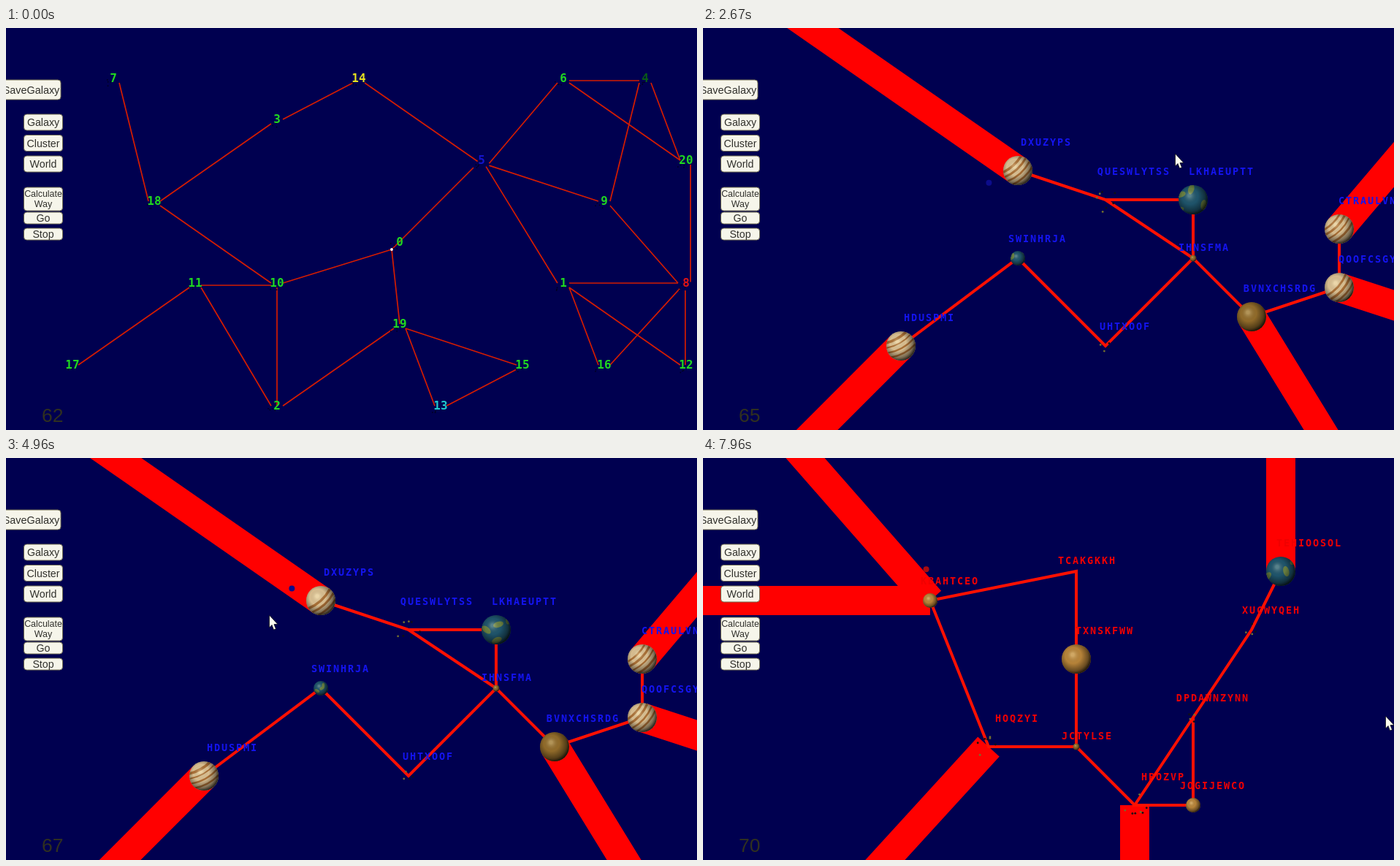
Animation, 946 px wide and 550 px high, one loop 8000 ms. Source, as an HTML page with a canvas:

```html
<!DOCTYPE html>
<html lang="en">
<head>
<meta charset="utf-8">
<title>Galaxy map</title>
<style>
html, body { margin: 0; width: 100%; height: 100%; overflow: hidden; background: #000050; }
canvas { display: block; }
</style>
</head>
<body>
<canvas id="stage" width="946" height="550"></canvas>
<script>
const ctx = document.getElementById('stage').getContext('2d');
const LOOP = 8000, ZOOM = 28, TAU = Math.PI * 2;
const SANS = '"Liberation Sans", Arial, sans-serif';
const MONO = '"DejaVu Sans Mono", monospace';

const ease = x => { x = Math.min(1, Math.max(0, x)); return x * x * (3 - 2 * x); };
const clamp = (v, mid, half) => Math.min(mid + half, Math.max(mid - half, v));
const noise = n => { const v = Math.sin(n * 127.1) * 43758.5; return v - Math.floor(v); };

// The map as a grid of numbered nodes
const nodes = {};
`. 7 . . . . . 14 . . . . 6 . 4 .
. . . . . 3 . . . . . . . . . .
. . . . . . . . . . 5 . . . . 20
. . 18 . . . . . . . . . . 9 . .
. . . . . . . . 0 . . . . . . .
. . . 11 . 10 . . . . . . 1 . . 8
. . . . . . . . 19 . . . . . . .
17 . . . . . . . . . . 15 . 16 . 12
. . . . . 2 . . . 13 . . . . . .`.split('\n').forEach((text, row) => text.split(' ').forEach((id, col) => {
  if (id !== '.') nodes[id] = { x: 91 + col * 56, y: 68 + row * 56 };
}));
const tint = { 14: '#e4e020', 4: '#0a5a18', 5: '#1414cc', 8: '#e01414', 13: '#20c8cc' };
const roads = '7-18 18-3 3-14 18-10 11-10 10-0 11-17 11-2 10-2 2-19 19-0 19-13 19-15 13-15 6-4 6-20 4-9 4-20 1-16 1-12';

const origin = id => [nodes[id].x - 11, nodes[id].y + 11];

// Where a road coming from (x, y) meets a node; node 0 is a single point
function port(id, x, y) {
  const n = nodes[id];
  return id === '0' ? origin(id) : [clamp(x, n.x, 8), clamp(y, n.y + 4, 3)];
}

// Bodies: name, kind, column, row, size. Links and exits refer to them by index.
const clusters = [
  makeCluster('5', '#1414f0', 8, 0, '0 1 2 4 1,8 3 9 4 7 6 5', '0-14 8-0 5-6 6-9 7-1',
    `DXUZYPS band 10 1 20
    QUESWLYTSS rock 13 2 20
    LKHAEUPTT earth 16 2 20
    SWINHRJA earth 10 4 10
    IHNSFMA dark 16 4 0
    CTRAULVN band 21 3 20
    QOOFCSGY band 21 5 20
    BVNXCHSRDG dark 18 6 20
    HDUSPMI band 6 7 20
    UHTXOOF rock 13 7 10`),
  makeCluster('8', '#f00000', 3, 9, '0 1 2 4 3 2,3 5 7 8 9 6 5', '9-9 9-1 6-16 3-12 0-20',
    `TEHIOOSOL earth 19 0 20
    XUCWYQEH rock 18 2 10
    DPDAWNZYNN rock 16 5 10
    HPOZVP rock 14 8 20
    JOGIJEWCO tan 16 8 10
    JCTYLSE dark 12 6 0
    HOQZYI rock 9 6 20
    TXNSKFWW tan 12 3 20
    TCAKGKKH rock 12 0 0
    KBAHTCEO tan 7 1 10`)
];

function makeCluster(id, color, anchor, host, links, exits, text) {
  const bodies = text.split('\n').map(row => {
    const [name, kind, col, line, size] = row.trim().split(' ');
    return { name, kind, x: 31 + 40 * col, y: 155 + 40 * line, size: +size };
  });
  const left = Math.min(...bodies.map(b => b.x)), bottom = Math.max(...bodies.map(b => b.y));
  const toMap = b => [origin(id)[0] + (b.x - left) / ZOOM, origin(id)[1] + (b.y - bottom) / ZOOM];
  return {
    id, color, bodies, at: origin(id), pos: [left, bottom],
    moonColor: id === '5' ? '#0c0c8c' : '#a80c10',
    host: bodies[host < bodies.length && id === '8' ? host : 0],
    links: links.split(',').map(p => p.split(' ').map(i => bodies[i])),
    exits: exits.split(' ').map(e => {
      const [i, far] = e.split('-'), near = toMap(bodies[i]);
      return [near, port(far, ...near)];
    })
  };
}

const segments = roads.split(' ').map(r => {
  const [a, b] = r.split('-');
  return [port(a, nodes[b].x, nodes[b].y + 4), port(b, nodes[a].x, nodes[a].y + 4)];
}).concat(...clusters.map(c => c.exits));

// Pointer stops: time, x, y
const pointer = [
  [900, 800, -24], [1290, 646, 172], [4100, 646, 172], [4800, 360, 215],
  [5400, 360, 215], [6250, 934, 353], [LOOP, 934, 353]
];

function dot(x, y, r, color) {
  ctx.fillStyle = color;
  ctx.beginPath();
  ctx.arc(x, y, r, 0, TAU);
  ctx.fill();
}

function polyline(points) {
  ctx.beginPath();
  points.forEach(p => ctx.lineTo(...p));
  ctx.stroke();
}

function label(text, x, y, font, color, align = 'center') {
  ctx.font = font;
  ctx.fillStyle = color;
  ctx.textAlign = align;
  ctx.fillText(text, x, y);
}

function bands(r, seed, t) {
  ctx.rotate(-0.35 - 0.6 * noise(seed));
  ctx.strokeStyle = 'rgba(160,88,24,0.75)';
  const drift = r * 0.35 * Math.sin(t / 1500 + seed);
  for (let i = -1; i < 3; i++) {
    const y = i * r * 0.36 + drift;
    ctx.lineWidth = r * (0.07 + 0.12 * noise(seed + i));
    ctx.beginPath();
    ctx.moveTo(-r, y - 2);
    ctx.quadraticCurveTo(0, y + 5, r, y - 2);
    ctx.stroke();
  }
}

function continents(r, seed, t) {
  ctx.fillStyle = '#6c8444';
  for (let i = 0; i < 5; i++) {
    const turn = ((noise(i + seed) + t / 9000) % 1) * 4 - 2;
    ctx.beginPath();
    ctx.ellipse(turn * r, (i - 2) * r * 0.36, r * 0.36, r * 0.2, i + seed, 0, TAU);
    ctx.fill();
  }
}

const skin = { band: '#e4c898', earth: '#205870', tan: '#c08a3c', dark: '#98702c' };

function planet(t, { kind, x, y, size }) {
  const r = size || 4.5;
  ctx.save();
  ctx.translate(x, y);
  ctx.beginPath();
  ctx.arc(0, 0, r, 0, TAU);
  ctx.clip();
  ctx.fillStyle = skin[kind];
  ctx.fillRect(-r, -r, 2 * r, 2 * r);
  ctx.save();
  if (kind === 'band') bands(r, x + y, t);
  if (kind === 'earth') continents(r, x, t);
  ctx.restore();
  const shade = ctx.createRadialGradient(-r * 0.25, -r * 0.3, r * 0.1, -r * 0.15, -r * 0.15, r * 1.2);
  shade.addColorStop(0, 'rgba(255,255,220,0.25)');
  shade.addColorStop(0.4, 'rgba(0,0,0,0.05)');
  shade.addColorStop(0.8, 'rgba(0,0,0,0.45)');
  shade.addColorStop(1, 'rgba(0,0,0,0.85)');
  ctx.fillStyle = shade;
  ctx.fillRect(-r, -r, 2 * r, 2 * r);
  ctx.restore();
}

function rocks(t, { x, y, size }) {
  for (let i = 0; i < size / 3; i++) {
    const a = noise(i + x) * TAU + t / 2900;
    const d = size * (0.4 + 0.45 * noise(i * 3 + y));
    dot(x + d * Math.cos(a), y + d * Math.sin(a), 1.4, i % 2 ? '#74702c' : '#101014');
  }
}

function drawCluster(t, c) {
  ctx.save();
  ctx.translate(...c.at);
  ctx.scale(1 / ZOOM, 1 / ZOOM);
  ctx.translate(-c.pos[0], -c.pos[1]);
  ctx.strokeStyle = '#ff1000';
  ctx.lineWidth = 4;
  c.links.forEach(path => polyline(path.map(b => [b.x, b.y])));
  c.bodies.forEach(b => (b.kind === 'rock' ? rocks : planet)(t, b));
  const a = (103.5 + t * 0.02) * Math.PI / 180;
  dot(c.host.x + 43 * Math.cos(a), c.host.y + 43 * Math.sin(a), 4, c.moonColor);
  ctx.letterSpacing = '1.9px';
  c.bodies.forEach(b => {
    const away = 15 + 1.2 * b.size;
    label(b.name, b.x + away, b.y - away + 5, 'bold 13.5px ' + MONO, c.color);
  });
  ctx.letterSpacing = '0px';
  ctx.restore();
}

function drawNodes(hover) {
  for (const id in nodes) {
    const { x, y } = nodes[id];
    for (let i = 0; i < 4; i++) {
      ctx.fillStyle = '#000018';
      ctx.fillRect(x - 13 + 12 * noise(+id + i * 7), y + 2 + 9 * noise(id * 3 + i), 1.5, 1.5);
    }
    if (id !== hover) label(id, x, y + 6, 'bold 16px ' + MONO, tint[id] || '#20d820');
  }
  dot(...origin('0'), 1.9, '#ffffff');
  if (!hover) return;
  ctx.strokeStyle = '#8c9c24';
  ctx.lineWidth = 1;
  ctx.beginPath();
  ctx.ellipse(...origin(hover), 26.5, 19, 0, 0, TAU);
  ctx.stroke();
}

function drawMap(t) {
  const first = t < 5000;
  const c = clusters[first ? 0 : 1];
  const k = ease((t - (first ? 1500 : 6580)) / 380);
  const scale = ZOOM ** k;
  const hover = t > (first ? 1280 : 6420) && c.id;
  // The zoom keeps one point of the stage fixed
  const [cx, cy] = c.at.map((v, i) => (ZOOM * v - c.pos[i]) / (ZOOM - 1));
  ctx.save();
  ctx.translate(cx * (1 - scale), cy * (1 - scale));
  ctx.scale(scale, scale);
  ctx.strokeStyle = scale > 2 ? '#ff0000' : '#d41c00';
  ctx.lineWidth = Math.max(40 / ZOOM, 1.7 / scale);
  segments.forEach(polyline);
  if (k < 0.3) drawNodes(hover);
  if (k > 0) drawCluster(t, c);
  ctx.restore();
}

function button(text, x, y, w, h, size = 14.2) {
  ctx.beginPath();
  ctx.roundRect(x, y, w, h, 4);
  ctx.fillStyle = '#f6f5ea';
  ctx.fill();
  ctx.strokeStyle = '#706c50';
  ctx.lineWidth = 1;
  ctx.stroke();
  const rows = text.split(' ');
  rows.forEach((s, i) => label(s, x + w / 2,
    y + h / 2 + size * 0.36 + (i - (rows.length - 1) / 2) * 14, size + 'px ' + SANS, '#30302c'));
}

function drawButtons() {
  button('SaveGalaxy', -6, 71, 81, 27, 14.4);
  ['Galaxy', 'Cluster', 'World'].forEach((s, i) => button(s, 24.5, 118 + i * 28.5, 53, 22));
  button('Calculate Way', 24.5, 218, 53, 32, 12.4);
  ['Go', 'Stop'].forEach((s, i) => button(s, 24.5, 252 + i * 22, 53, 16));
}

function drawPointer(t) {
  const i = pointer.findIndex(p => p[0] > t);
  if (i < 1) return;
  const [t0, x0, y0] = pointer[i - 1], [t1, x1, y1] = pointer[i];
  const k = ease((t - t0) / (t1 - t0));
  ctx.save();
  ctx.translate(x0 + (x1 - x0) * k, y0 + (y1 - y0) * k);
  const arrow = new Path2D('M0.5 0V17L4 13.5L6.5 20L9.5 18.8L7 12.5H12Z');
  ctx.fillStyle = '#fffff0';
  ctx.fill(arrow);
  ctx.strokeStyle = '#101018';
  ctx.lineWidth = 0.8;
  ctx.stroke(arrow);
  ctx.restore();
}

function frame(now) {
  const t = now % LOOP;
  ctx.fillStyle = '#000050';
  ctx.fillRect(0, 0, 946, 550);
  drawMap(t);
  drawButtons();
  label(Math.floor(62.83 + t / 1000), 49, 539, '26.5px ' + SANS, '#303020', 'left');
  drawPointer(t);
  requestAnimationFrame(frame);
}
requestAnimationFrame(frame);
</script>
</body>
</html>
```
